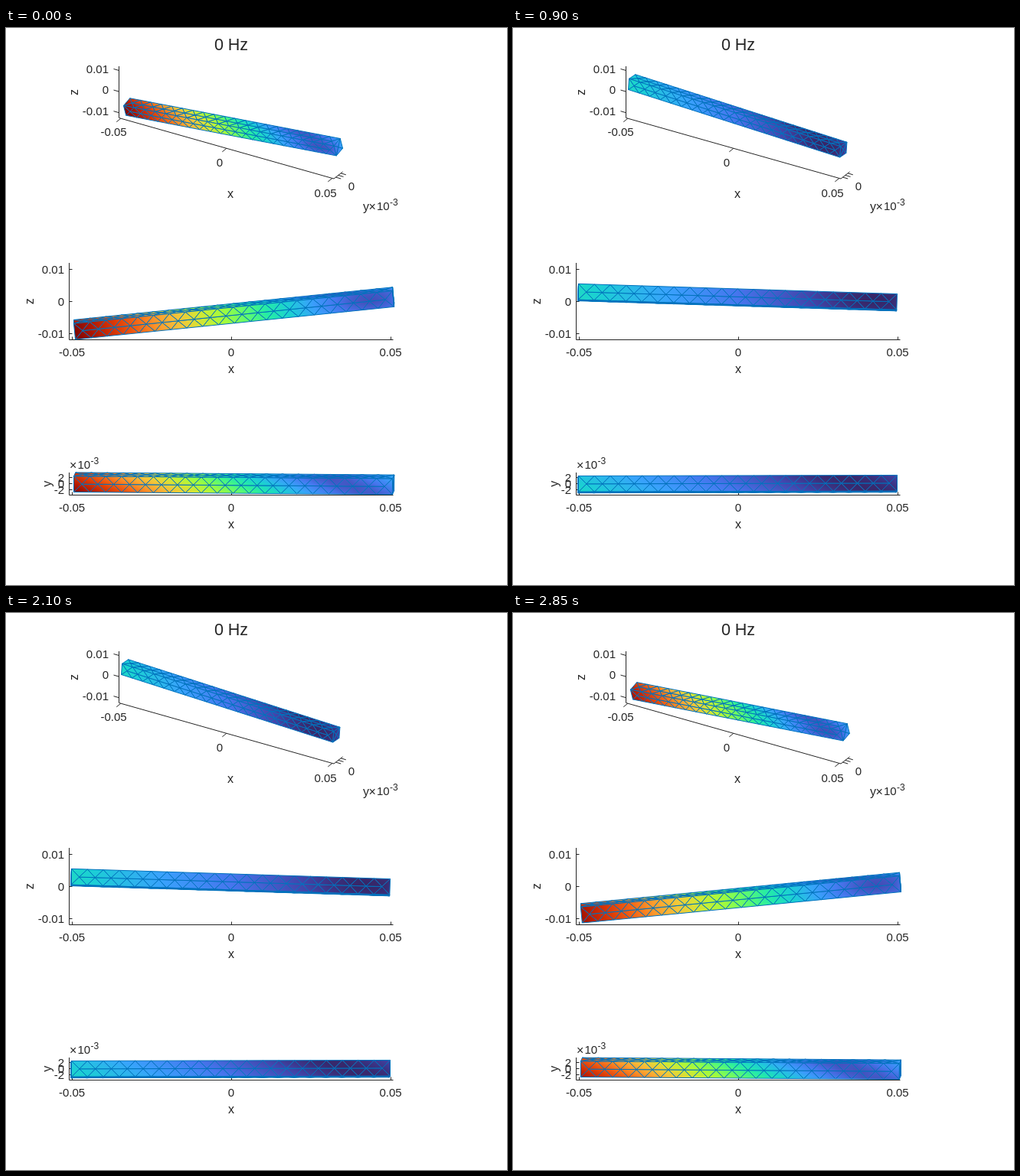
These frames come from a looping animation (654x728 px, 3 s). An HTML page with a canvas:

```html
<!DOCTYPE html>
<html>
<head>
<meta charset="utf-8">
<style>
html, body { margin: 0; overflow: hidden; background: #fff; }
canvas { display: block; }
</style>
</head>
<body>
<canvas id="stage" width="654" height="728"></canvas>
<script>
const ctx = document.getElementById('stage').getContext('2d');
const STEP = 150, STEPS = 20;
const L = 208, H = 10.4, CELLS = 20;   // beam half length, half thickness
const MAX_DISP = 40.2;
const INK = '#262626', EDGE = '#0072bd';

const turbo = ('30123b 4145ab 4675ed 39a2fc 1bcfd4 24eca6 61fc6c a4fc3b ' +
  'd1e834 f3c63a fe9b2d f36315 d93806 b11901 7a0402').split(' ')
  .map(h => [0, 2, 4].map(i => parseInt(h.substr(i, 2), 16)));

function color(v) {
  const s = Math.min(Math.max(v, 0), 1) * (turbo.length - 1);
  const i = Math.min(Math.floor(s), turbo.length - 2), f = s - i;
  return `rgb(${turbo[i].map((a, k) => Math.round(a + (turbo[i + 1][k] - a) * f))})`;
}

// Surface mesh, triangles counter-clockwise seen from outside
function buildMesh() {
  const tris = [];
  const w = 2 * L / CELLS;
  for (const [c, s] of [[1, 0], [0, 1], [-1, 0], [0, -1]]) {
    const at = (x, t) => [x, t * c - H * s, t * s + H * c];
    for (let i = 0; i < CELLS; i++) {
      const x0 = -L + i * w, x1 = x0 + w, mid = at(x0 + w / 2, 0);
      const a = at(x0, -H), b = at(x1, -H), d = at(x1, H), e = at(x0, H);
      tris.push([a, b, mid], [d, e, mid]);
      if (i) {
        const prev = at(x0 - w / 2, 0);
        tris.push([prev, a, mid], [mid, e, prev]);
      } else tris.push([e, a, mid]);
      if (i === CELLS - 1) tris.push([b, d, mid]);
    }
    for (const x of [-L, L]) {
      const cap = [at(x, H), at(x, -H), [x, 0, 0]];
      tris.push(x > 0 ? [cap[1], cap[0], cap[2]].reverse() : [cap[0], cap[1], cap[2]].reverse());
    }
  }
  return tris;
}
const mesh = buildMesh();

// Rigid-body mode: translation plus small rotations
const mode = ([x, y, z]) => [
  3.4 + 0.0077 * y - 0.1025 * z,
  0.6 - 0.0077 * x - 0.23 * z,
  -15.9 + 0.1025 * x + 0.23 * y
];

const views = [
  ([x, y, z]) => [294 + 0.663 * x + 0.393 * y, 118.3 + 0.1925 * x - 0.3165 * y - 0.665 * z],
  ([x, y, z]) => [294.2 + x, 357 - z],
  ([x, y, z]) => [294.2 + x, 595.9 - y]
];

function drawTriangle(p, v) {
  const [[ax, ay], [bx, by], [cx, cy]] = p;
  const ux = bx - ax, uy = by - ay, wx = cx - ax, wy = cy - ay;
  const area = ux * wy - uy * wx;
  if (area >= -1e-6) return;
  const dv = v[1] - v[0], dw = v[2] - v[0];
  const gx = (dv * wy - dw * uy) / area, gy = (dw * ux - dv * wx) / area;
  const g2 = gx * gx + gy * gy;
  ctx.fillStyle = color(v[0]);
  if (g2 > 1e-12) {
    const lo = Math.min(...v), hi = Math.max(...v);
    const s = (lo - v[0]) / g2, e = (hi - v[0]) / g2;
    const grad = ctx.createLinearGradient(ax + gx * s, ay + gy * s, ax + gx * e, ay + gy * e);
    for (const f of [0, 0.5, 1]) grad.addColorStop(f, color(lo + (hi - lo) * f));
    ctx.fillStyle = grad;
  }
  ctx.beginPath();
  p.forEach(q => ctx.lineTo(...q));
  ctx.closePath();
  ctx.fill();
  ctx.stroke();
}

function drawBeam(project, amp) {
  ctx.strokeStyle = EDGE;
  ctx.lineWidth = 1;
  ctx.lineJoin = 'round';
  for (const tri of mesh) {
    const disp = tri.map(mode);
    const pts = tri.map((q, i) => project(q.map((a, k) => a + amp * disp[i][k])));
    drawTriangle(pts, disp.map(d => Math.abs(amp) * Math.hypot(...d) / MAX_DISP));
  }
}

function line(...xy) {
  ctx.beginPath();
  for (let i = 0; i < xy.length; i += 2) ctx.lineTo(xy[i], xy[i + 1]);
  ctx.stroke();
}

// y is the middle of the digits
function text(str, x, y, align = 'center', size = 15) {
  ctx.font = `${size}px "Liberation Sans", Arial, sans-serif`;
  ctx.textAlign = align;
  ctx.fillText(str, x, y + size * 0.36);
}

function upright(str, x, y) {
  ctx.save();
  ctx.translate(x, y);
  ctx.rotate(-Math.PI / 2);
  text(str, 0, 0, 'center', 16);
  ctx.restore();
}

function exponent(x, y) {
  text('×', x, y, 'left', 16);
  text('10', x + 10.5, y, 'left');
  text('-3', x + 27.5, y - 5.5, 'left', 12);
}

function axes3d() {
  line(147.5, 50, 147.5, 117.5, 428, 197, 439.5, 188);
  ['0.01', '0', '-0.01'].forEach((s, i) => {
    const y = 55.5 + i * 27.6;
    line(147.5, y, 140.5, y - 2);
    text(s, 134, y - 2.3, 'right');
  });
  ['-0.05', '0', '0.05'].forEach((s, i) => {
    const x = 149.8 + i * 138, y = 118.2 + i * 39.1;
    line(x, y, x - 5.5, y + 4.5);
    text(s, 140.5 + i * 138.3, 136 + i * 40);
  });
  for (let i = 0; i < 3; i++) {
    const x = 430.4 + i * 3.3, y = 195 - i * 2.6;
    line(x, y, x + 6.8, y + 2);
  }
  text('0', 451, 207);
  text('x', 293, 216, 'center', 16);
  text('y', 466, 233.5, 'left', 16);
  exponent(473.5, 233);
  upright('z', 88, 84);
}

function axes2d(top, bottom, name, nameX, ticks) {
  line(82.5, top, 82.5, bottom, 505.5, bottom);
  ['-0.05', '0', '0.05'].forEach((s, i) => {
    const x = 86.5 + 208 * i;
    line(x, bottom, x, bottom - 4);
    text(s, x - 0.5, bottom + 16);
  });
  for (const [s, y] of ticks) {
    line(82.5, y, 86.5, y);
    text(s, 76, y, 'right');
  }
  text('x', 294, bottom + 37.5, 'center', 16);
  upright(name, nameX, (top + bottom) / 2);
}

function draw(step) {
  ctx.fillStyle = '#fff';
  ctx.fillRect(0, 0, 654, 728);
  ctx.fillStyle = ctx.strokeStyle = INK;
  ctx.lineWidth = 1;
  text('0 Hz', 294, 21.5, 'center', 21.5);
  axes3d();
  axes2d(307, 407.5, 'z', 30, [['0.01', 315.5], ['0', 357.5], ['-0.01', 399.5]]);
  axes2d(581, 610.5, 'y', 53, [['2', 587.5], ['0', 595.5], ['-2', 603.5]]);
  exponent(83, 571);
  const amp = Math.cos(2 * Math.PI * step / STEPS);
  for (const view of views) drawBeam(view, amp);
}

let shown = -1;
function tick() {
  const step = Math.floor(performance.now() / STEP) % STEPS;
  if (step !== shown) draw(shown = step);
  requestAnimationFrame(tick);
}
tick();
</script>
</body>
</html>
```
